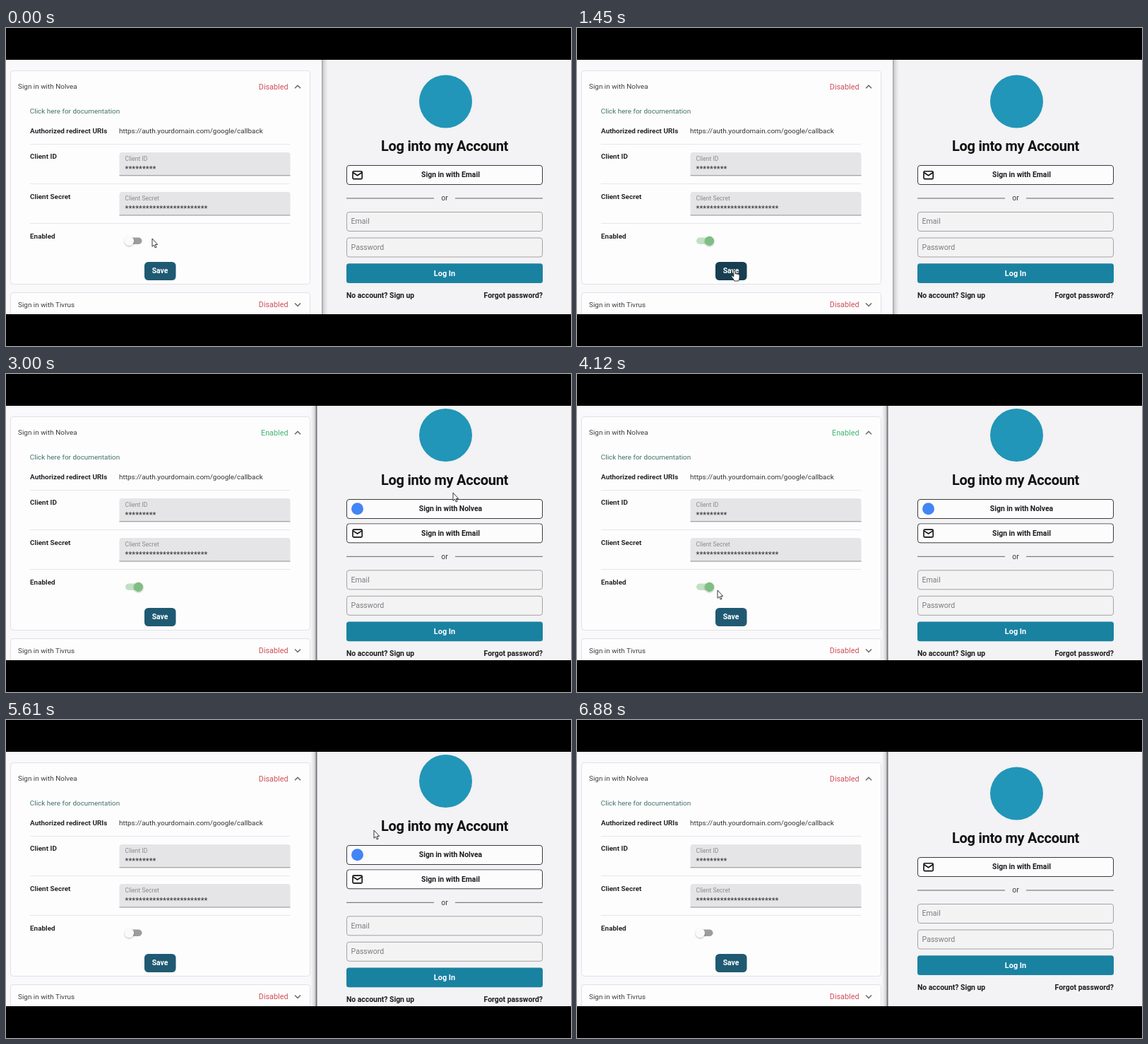
An HTML page that plays this animation: 800x450 px, repeating every 6910 ms.

```html
<!DOCTYPE html>
<html lang="en">
<head>
<meta charset="utf-8">
<title>Sign-in settings</title>
<style>
html, body { margin: 0; width: 100%; height: 100%; overflow: hidden; background: #000; }
svg { display: block; width: 800px; height: 450px; }
text { font-family: Roboto, sans-serif; font-size: 9.93px; fill: #3c3c40; }
.b { font-weight: 700; fill: #26262a; }
.link { fill: #3f7168; }
.url { fill: #333; }
.status { font-size: 10.8px; text-anchor: end; }
.red { fill: #cb5059; }
.green { fill: #3fb572; }
.hint { font-size: 8.55px; fill: #8b8b8e; }
.stars { font-size: 11.3px; fill: #333; }
.white { fill: #fff; font-weight: 700; text-anchor: middle; }
.mid { text-anchor: middle; }
.login .b { font-size: 10.4px; fill: #1c1c1f; }
.login .title { font-size: 20px; letter-spacing: -.25px; fill: #111; }
.ph { font-size: 10.6px; fill: #7b7b7e; }
.line { stroke: #e6e5e7; }
.chev { fill: none; stroke: #666; stroke-width: 1.5; }
.btn { fill: #fdfcfd; stroke: #3a3a3c; }
.input { fill: #f4f3f4; stroke: #a2a2a4; }

/* everything shares one clock */
.a { animation: 6.91s linear infinite; }
.step { animation-timing-function: step-end; }

.leftFront { animation-name: leftFront; }
@keyframes leftFront {
  0%, 62.23% { visibility: visible; }
  28.2%, 79.6%, 100% { visibility: hidden; }
}
.rightFront { animation-name: rightFront; }
@keyframes rightFront {
  0%, 62.23% { visibility: hidden; }
  28.2%, 79.6%, 100% { visibility: visible; }
}
.on { animation-name: on; }
@keyframes on {
  0%, 71.35%, 100% { visibility: hidden; }
  22.87% { visibility: visible; }
}
.off { animation-name: off; }
@keyframes off {
  0%, 71.35%, 100% { visibility: visible; }
  22.87% { visibility: hidden; }
}
.extra { animation-name: extra; }
@keyframes extra {
  0%, 89.7%, 100% { visibility: hidden; }
  35.02% { visibility: visible; }
}
.up { animation-name: up; }
@keyframes up {
  0%, 89.7%, 100% { transform: translateY(0); }
  35.02% { transform: translateY(-17.5px); }
}
.down { animation-name: down; }
@keyframes down {
  0%, 89.7%, 100% { transform: translateY(0); }
  35.02% { transform: translateY(17.3px); }
}
.track { animation-name: track; }
@keyframes track {
  0%, 10.85%, 63.4%, 100% { fill: #9c9c9e; transform: none; }
  12%, 62.23% { fill: #c1e0c3; transform: translateX(-1px); }
}
.knob { animation-name: knob; }
@keyframes knob {
  0%, 10.85%, 63.4%, 100% { fill: #fafafa; transform: none; }
  12%, 62.23% { fill: #7ebe83; transform: translateX(13px); }
}
.save { animation-name: save; }
@keyframes save {
  0%, 24.2%, 73.8%, 100% { fill: #1f5a72; }
  16.6%, 67.5% { fill: #173f51; }
}
.cursor { animation-name: cursor; animation-timing-function: ease-in-out; }
@keyframes cursor {
  0%, 5.21% { transform: translate(207px, 298px); }
  8.68%, 13.02% { transform: translate(187px, 300px); }
  17.37%, 23.8% { transform: translate(223px, 343px); }
  28.2% { transform: translate(470px, 150px); animation-timing-function: linear; }
  30.39% { transform: translate(560px, 25px); }
  36% { transform: translate(590px, 25px); }
  42.7%, 44.43% { transform: translate(633px, 168px); }
  54.27%, 60.06% { transform: translate(199px, 306px); }
  62%, 64.4% { transform: translate(189px, 301px); }
  68%, 73.5% { transform: translate(219.5px, 343px); }
  81.2% { transform: translate(521px, 156px); }
  83.4%, 100% { transform: translate(575px, 25px); }
}
.arrow { animation-name: arrow; }
@keyframes arrow {
  0%, 13.4%, 24.2%, 64.8%, 73.8%, 100% { visibility: visible; }
  8.2%, 16.6%, 61.5%, 67.5% { visibility: hidden; }
}
.hand { animation-name: hand; }
@keyframes hand {
  0%, 13.4%, 24.2%, 64.8%, 73.8%, 100% { visibility: hidden; }
  8.2%, 16.6%, 61.5%, 67.5% { visibility: visible; }
}
</style>
</head>
<body>
<svg viewBox="0 0 800 450">
  <defs>
    <linearGradient id="toRight">
      <stop offset="0" stop-color="#77777b" stop-opacity=".75"/>
      <stop offset=".25" stop-color="#99999c" stop-opacity=".4"/>
      <stop offset="1" stop-color="#bbb" stop-opacity="0"/>
    </linearGradient>
    <linearGradient id="toLeft">
      <stop offset="0" stop-color="#bbb" stop-opacity="0"/>
      <stop offset=".75" stop-color="#99999c" stop-opacity=".35"/>
      <stop offset="1" stop-color="#77777b" stop-opacity=".7"/>
    </linearGradient>
    <filter id="soft" x="-50%" y="-50%" width="200%" height="200%">
      <feDropShadow dx="0" dy="1" stdDeviation="1" flood-opacity=".3"/>
    </filter>
  </defs>

  <rect width="800" height="450" fill="#f3f2f4"/>

  <!-- settings window -->
  <rect y="45" width="440" height="360" fill="#f9f8fa"/>
  <rect class="a step leftFront" x="439" y="45" width="8" height="360" fill="#f9f8fa"/>
  <rect class="a step leftFront" x="447" y="45" width="9" height="360" fill="url(#toRight)"/>
  <g fill="#fefdfe" stroke="#e1e0e2">
    <rect x="6.5" y="60.5" width="424" height="302" rx="4"/>
    <rect x="6.5" y="374.5" width="424" height="60" rx="4"/>
  </g>
  <g class="a step rightFront">
    <rect x="431" y="45" width="8" height="360" fill="url(#toLeft)"/>
    <rect x="439" y="45" width="1.5" height="360" fill="#747478"/>
  </g>

  <text x="17" y="86.4">Sign in with Nolvea</text>
  <text class="status red a step off" x="399.5" y="87">Disabled</text>
  <text class="status green a step on" x="399.5" y="87">Enabled</text>
  <path class="chev" d="M409 85.3l4-4 4 4"/>
  <text class="link" x="33.8" y="120.8">Click here for documentation</text>
  <text class="b" x="34" y="148.8">Authorized redirect URIs</text>
  <text class="url" x="160" y="148.8">https://auth.yourdomain.com/google/callback</text>
  <path class="line" d="M34 164.5H402M34 220.5H402M34 276.5H402"/>

  <text class="b" x="34" y="185.4">Client ID</text>
  <text class="b" x="34" y="241.6">Client Secret</text>
  <text class="b" x="34" y="297.8">Enabled</text>
  <g fill="#e5e4e6">
    <path d="M160.5 209V180q0-4 4-4H398.500q4 0 4 4V209z"/>
    <path d="M160.5 265V236q0-4 4-4H398.500q4 0 4 4V265z"/>
  </g>
  <path d="M160.500 208.800H402.500M160.500 265H402.500" stroke="#8d8d90"/>
  <text class="hint" x="168.600" y="187.600">Client ID</text>
  <text class="stars" x="168.600" y="202.600">*********</text>
  <text class="hint" x="168.600" y="243.600">Client Secret</text>
  <text class="stars" x="168.600" y="258.600">************************</text>

  <rect class="a track" x="170" y="296.500" width="22.500" height="9.500" rx="4.750"/>
  <circle class="a knob" cx="174.500" cy="301.300" r="6.600" filter="url(#soft)"/>
  <rect class="a step save" x="196" y="331" width="44.500" height="26" rx="5.500"/>
  <text class="white" x="218" y="346.600" style="font-size:10.400px">Save</text>

  <text x="17" y="394.600">Sign in with Tivrus</text>
  <text class="status red" x="399.500" y="395">Disabled</text>
  <path class="chev" d="M409 389.500l4 4 4-4"/>

  <!-- login window -->
  <g class="login">
    <g class="a step up">
      <circle cx="622.500" cy="104" r="37.500" fill="#2196b8"/>
      <text class="b title mid" x="621" y="174">Log into my Account</text>
    </g>
    <g class="a step extra">
      <rect class="btn" x="482.500" y="177.500" width="277" height="27" rx="3.500"/>
      <circle cx="497.500" cy="190.700" r="8.500" fill="#4285f4"/>
      <text class="b mid" x="629.500" y="193.800">Sign in with Nolvea</text>
    </g>
    <g class="a step down">
      <rect class="btn" x="482.500" y="194.500" width="277" height="27" rx="3.500"/>
      <g fill="none" stroke="#111" stroke-width="1.600">
        <rect x="491" y="202.800" width="13.200" height="10.800" rx="1.300"/>
        <path d="M491.300 204.500l6.300 4.200 6.300-4.200"/>
      </g>
      <text class="b mid" x="629.500" y="211.400">Sign in with Email</text>
      <path d="M482 241H606M636 241H760" stroke="#626264"/>
      <text class="mid" x="621" y="244.400" style="font-size:10.500px">or</text>
      <rect class="input" x="482.500" y="260.500" width="277" height="27" rx="3.500"/>
      <rect class="input" x="482.500" y="297" width="277" height="27" rx="3.500"/>
      <text class="ph" x="488.500" y="277.400">Email</text>
      <text class="ph" x="488.500" y="314.200">Password</text>
      <rect x="482" y="333.300" width="278" height="27.700" rx="3.500" fill="#1a82a1"/>
      <text class="white" x="621" y="350.800" style="font-size:10.900px">Log In</text>
      <text class="b" x="482" y="382">No account? Sign up</text>
      <text class="b" x="760" y="382" text-anchor="end">Forgot password?</text>
    </g>
  </g>

  <g class="a cursor">
    <path class="a step arrow" d="M0 0V11.300L2.500 9 4.200 13 6 12.200 4.300 8.400H7.600z"
      fill="#fff" stroke="#222" stroke-width=".9" stroke-linejoin="round"/>
    <path class="a step hand" d="M-1.200 .8q1.200-1.600 2.400 0V5q1.200-1 2.200 .2 1.200-.7 2 .5 1.500-.4 1.700 1.200V10q-.2 2.500-1.300 5H-.2Q-1.500 12-4.200 9q-.6-1.800 1-1.700L-1.200 9z"
      fill="#fff" stroke="#222" stroke-width=".9" stroke-linejoin="round"/>
  </g>

  <path d="M0 0H800V45H0zM0 405H800V450H0z"/>
</svg>
</body>
</html>
```
